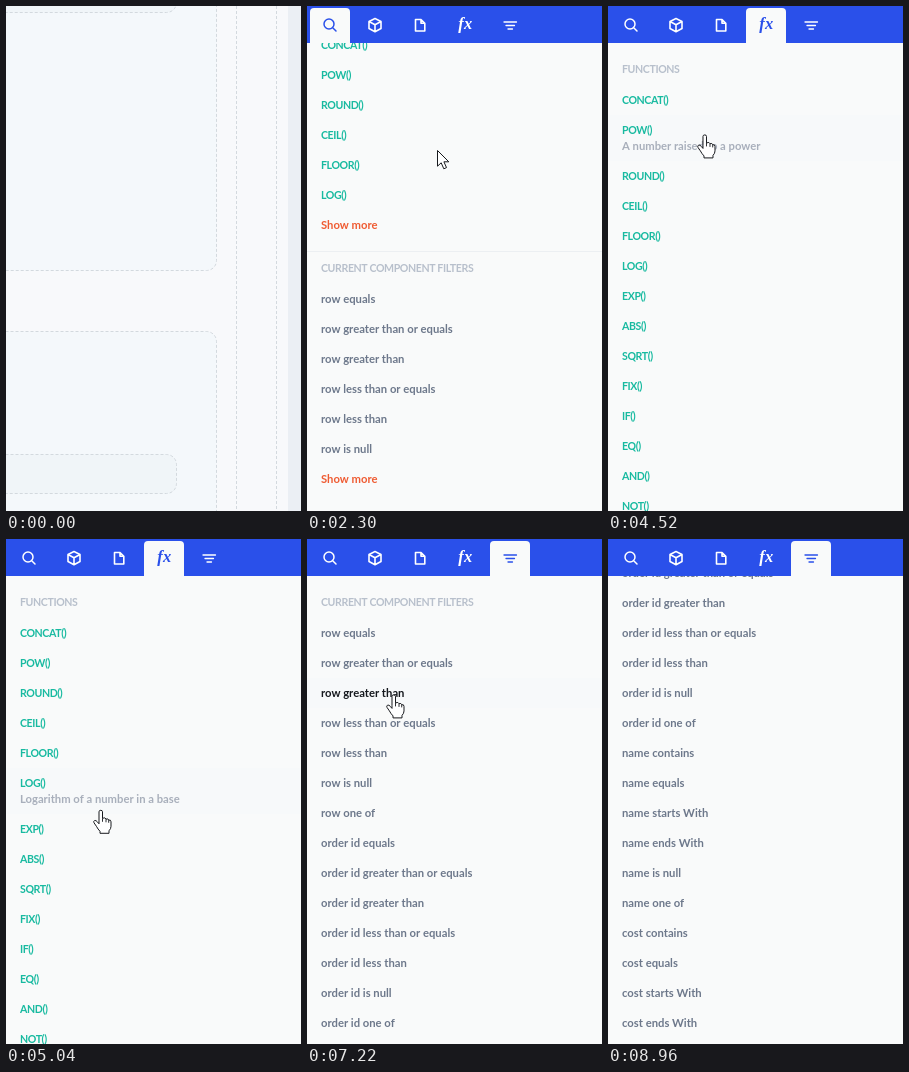
An HTML page with a canvas for the animation above (9020 ms loop, 295 by 505 pixels).

```html
<!DOCTYPE html>
<html lang="en">
<head>
<meta charset="utf-8">
<title>Data picker</title>
<style>
html, body { margin: 0; width: 295px; height: 505px; overflow: hidden; background: #f9fafa; }
canvas { display: block; }
</style>
</head>
<body>
<canvas id="stage" width="295" height="505"></canvas>
<script>
const ctx = document.getElementById('stage').getContext('2d');
const W = 295, H = 505, LOOP = 9020, HEADER = 37;
const BLUE = '#2a50ea', PANEL = '#f9fafa', TEAL = '#18baa0';
const INK = { row: '#6d788b', head: '#b8c0cc', empty: '#9aa4b4', desc: '#a8afbb', fn: TEAL, more: '#ef5b32' };
const BODY = { font: 'bold 11.25px Lato, sans-serif', spacing: '0px' };
const CAPS = { font: 'bold 10.6px Lato, sans-serif', spacing: '-0.4px' };
const SERIF = { font: "italic bold 16.5px 'Liberation Serif', serif", spacing: '0.5px' };

const ease = {
  in: p => 1 - Math.cos(p * Math.PI / 2),
  out: p => Math.sin(p * Math.PI / 2),
  both: p => (1 - Math.cos(p * Math.PI)) / 2
};

// Tracks: [time, value..., easing used to arrive there]
const cursorTrack = [
  [760, 293, 352], [1220, 132, 132, 'both'],
  [1420, 132, 132], [1590, 130, 144, 'both'],
  [2720, 130, 144], [2880, 88, 151, 'both'],
  [3110, 88, 151], [3610, 157, 28, 'both'],
  [4150, 157, 28], [4520, 97, 128, 'in'], [5060, 95, 271, 'out'],
  [5660, 95, 271], [6340, 197, 26, 'both'],
  [6870, 197, 26], [7220, 87, 155, 'in'], [7780, 87, 297, 'out'],
  [8590, 87, 297], [8960, 296, 62, 'both']
];
const scrollTracks = [
  [[1615, 0], [1740, 130, 'both'], [1910, 130], [2320, 533, 'both'], [2720, 533], [2840, 549, 'both']],
  [[5070, 0], [5500, 359, 'both']],
  [[7790, 0], [8020, 300, 'both']]
];

function sample(track, t, dims) {
  const pick = k => k.slice(1, 1 + dims);
  if (t <= track[0][0]) return pick(track[0]);
  const i = track.findIndex(k => k[0] > t);
  if (i < 0) return pick(track[track.length - 1]);
  const a = track[i - 1], b = track[i];
  const p = ease[b[dims + 1] || 'both']((t - a[0]) / (b[0] - a[0]));
  return pick(a).map((v, n) => v + (b[n + 1] - v) * p);
}

const functions = [
  ['CONCAT', 'Joins several text values together'],
  ['POW', 'A number raised to a power'],
  ['ROUND', 'Rounds number to nearest multiple of a factor'],
  ['CEIL', 'Rounds number up to nearest multiple of a factor'],
  ['FLOOR', 'Rounds number down to nearest multiple of a factor'],
  ['LOG', 'Logarithm of a number in a base'],
  ['EXP', 'Euler\u2019s number raised to a power'],
  ['ABS', 'Absolute value of a number'],
  ['SQRT', 'Square root of a number'],
  ['FIX', 'Rounds number to decimal places'],
  ['IF', 'Picks a value by a condition'],
  ['EQ', 'Whether two values are equal'],
  ['AND', 'Whether all values are true'],
  ['NOT', 'Opposite of a true or false value'],
  ['OR', 'Whether any value is true'],
  ['XOR', 'Whether exactly one value is true'],
  ['SIZE', 'Number of items in a dataset'],
  ['MIN', 'Minimum value in a numeric dataset'],
  ['MAX', 'Maximum value in a numeric dataset'],
  ['AVERAGE', 'Average of a numeric dataset'],
  ['SUM', 'Sum of a numeric dataset'],
  ['STRING', 'Converts a value to text'],
  ['NUMBER', 'Converts a value to a number'],
  ['JSON', 'Converts a value to JSON'],
  ['SLUGIFY', 'Converts text to a slug']
].map(([name, desc]) => ({ kind: 'fn', text: name + '()', desc }));

const numeric = ['equals', 'greater than or equals', 'greater than', 'less than or equals', 'less than', 'is null', 'one of'];
const textual = ['contains', 'equals', 'starts With', 'ends With', 'is null', 'one of'];
const row = (text, extra) => ({ kind: 'row', text, ...extra });
const filterRows = (field, tests) => tests.map(test => row(field + ' ' + test, { live: true }));
const filters = [
  ...filterRows('row', numeric), ...filterRows('order id', numeric),
  ...filterRows('name', textual), ...filterRows('cost', textual)
];
const more = { kind: 'more', text: 'Show more' };
const nothing = { kind: 'empty', text: 'Nothing here' };
const open = { chevron: true };

// Gives every item its resting y; sections are [heading, items].
function layout(sections) {
  const items = [];
  let y = 63;
  sections.forEach(([title, rows], n) => {
    items.push({ kind: 'head', text: title, y, ruled: n > 0 });
    y += 31;
    for (const item of rows) { items.push({ ...item, y }); y += 30; }
    y += 13;
  });
  return items;
}

const lists = [
  layout([
    ['COMPONENTS', [row('Orders', { icon: 'table', ...open }), row('User Detail', open), row('Order Details', open),
      row('Media', { icon: 'stack', ...open }), row('Transaction details', open),
      row('Amount', { icon: 'letter', value: '84900', live: true }), more]],
    ['PAGE PARAMETERS', [nothing]],
    ['USER PROPERTIES', [nothing]],
    ['TEAM PROPERTIES', [nothing]],
    ['FUNCTIONS', [...functions.slice(0, 6), more]],
    ['CURRENT COMPONENT FILTERS', [...filters.slice(0, 6), more]]
  ]),
  layout([['FUNCTIONS', functions]]),
  layout([['CURRENT COMPONENT FILTERS', filters]])
];

function text(str, x, y, color, style = BODY, align = 'left') {
  ctx.font = style.font;
  ctx.letterSpacing = style.spacing;
  ctx.fillStyle = color;
  ctx.textAlign = align;
  ctx.fillText(str, x, y + 4);
}

function stroke(d, color, width) {
  ctx.strokeStyle = color;
  ctx.lineWidth = width;
  ctx.stroke(new Path2D(d));
}

function box(x, y, w, h, r, fill) {
  ctx.beginPath();
  ctx.roundRect(x, y, w, h, r);
  ctx.fillStyle = fill;
  ctx.fill();
}

function drawCanvasPage() {
  ctx.fillStyle = '#f8f9fb';
  ctx.fillRect(0, 0, W, H);
  ctx.fillStyle = '#ebeff4';
  ctx.fillRect(282, 0, 13, H);
  ctx.lineWidth = 1;
  ctx.strokeStyle = '#d3d9de';
  ctx.setLineDash([3, 2]);
  const frame = (right, top, bottom, fill) => {
    box(-30.5, top, right + 30.5, bottom - top, 10, fill);
    ctx.stroke();
  };
  frame(210.5, -40.5, 264.5, '#f4f8fb');
  frame(210.5, 325.5, 560.5, '#f4f8fb');
  frame(170.5, -32.5, 6.5, '#f0f5f8');
  frame(170.5, 448.5, 487.5, '#f0f5f8');
  stroke('M230.5 0V505M270.5 0V505', '#d3d9de', 1);
  ctx.setLineDash([]);
}

function drawIcon(kind, y) {
  ctx.save();
  ctx.translate(14, y - 6);
  const color = '#9ba1b4';
  if (kind === 'table') stroke('M1.5 1.5H12.5V12.5H1.5ZM1.5 4.5H12.5M5 4.5V12.5M9 4.5V12.5', color, 1.2);
  if (kind === 'stack') stroke('M1.5 4.5H10V12.5H1.5ZM1.5 6H10M3.5 3V1.5H12.5V10.5H11.5', color, 1.2);
  if (kind === 'letter') stroke('M2.5 11.5L7 2L11.5 11.5M4.2 8.4H9.8', color, 1.5);
  ctx.restore();
}

function findHover(items, t, scroll, [x, y]) {
  const idle = t < 760 || (t > 1220 && t < 2720) || (t > 8000 && t < 8590) || t >= 8960;
  if (idle || y < HEADER || x > W) return null;
  // Moving down, an expanded row keeps the pointer over its description.
  const reach = t > 4150 && t < 5070 ? 31 : 15;
  return items.find(i => (i.desc || i.live) && y >= i.y - scroll - 15 && y < i.y - scroll + reach) || null;
}

function drawList(items, t, target, pointer) {
  const hover = findHover(items, t, target, pointer);
  const grow = hover && hover.desc ? 16 : 0;
  const end = items[items.length - 1].y + grow - 471;
  const scroll = Math.min(target, Math.max(0, end));
  ctx.save();
  ctx.beginPath();
  ctx.rect(0, HEADER, W, H - HEADER);
  ctx.clip();
  for (const item of items) {
    const y = Math.round(item.y - scroll + (hover && item.y > hover.y ? grow : 0));
    if (y < 0 || y > H + 30) continue;
    const active = item === hover;
    if (active) {
      ctx.fillStyle = '#f7f9fa';
      ctx.fillRect(0, y - 15, W, 30 + grow);
    }
    if (item.ruled) {
      ctx.fillStyle = '#eceff2';
      ctx.fillRect(0, y - 17, W, 1);
    }
    const caps = item.kind === 'head' || item.kind === 'fn';
    const color = active && item.live ? '#15181d' : INK[item.kind];
    text(item.text, item.icon ? 34 : 14, y, color, caps ? CAPS : BODY);
    if (item.icon) drawIcon(item.icon, y);
    if (item.value) text(item.value, 282, y, '#98a2b2', BODY, 'right');
    if (item.chevron) stroke(`M272.5 ${y - 3.5}l4.5 4.5l-4.5 4.5`, '#8d97a7', 1.3);
    if (active && item.desc) text(item.desc, 14, y + 16, INK.desc);
  }
  ctx.restore();
}

function drawHeader(active) {
  ctx.fillStyle = BLUE;
  ctx.fillRect(0, 0, W, HEADER);
  box(3 + 45 * active, 2, 40, 35, [4, 4, 0, 0], PANEL);
  const tint = n => n === active ? BLUE : '#ffffff';
  ctx.lineCap = ctx.lineJoin = 'round';
  stroke('M27 18A5 5 0 1 1 17 18A5 5 0 1 1 27 18M25.7 21.7L29 25', tint(0), 1.5);
  stroke('M68 12.5L74 15.5V22.5L68 25.7L62 22.5V15.5ZM62 15.5L68 18.7L74 15.5M68 18.7V25.7', tint(1), 1.6);
  stroke('M108.5 13.5H114L117.8 17.3V25H108.5ZM114 13.5V17.3H117.8', tint(2), 1.6);
  text('fx', 158.5, 19, tint(3), SERIF, 'center');
  stroke('M197 16H209.5M199 19.5H207.5M201 23H205.5', tint(4), 1.3);
  ctx.lineCap = 'butt';
}

const arrow = new Path2D('M.5 .5V16.2L4.2 12.8L6.8 18.8L9.5 17.6L6.9 11.8H11.8Z');
const hand = new Path2D('M-2 11V2Q-2 .5 -.2 .5Q1.5 .5 1.5 2V8.5Q4.4 7.2 5 9.3Q7.3 8.4 7.7 10.3Q10 9.8 10 12V16.5Q10 19 8 21V23.5H-1V21.5Q-3 19.5 -4.6 16.5L-7 13Q-7.8 11.5 -6.5 10.8Q-5 10.2 -3.7 12L-2 14Z');

function drawCursor(t, [x, y]) {
  if (t < 760 || t >= 8960) return;
  const isHand = t >= 2720;
  const shape = isHand ? hand : arrow;
  ctx.save();
  ctx.translate(x, y);
  ctx.lineJoin = 'round';
  ctx.fillStyle = '#ffffff';
  ctx.strokeStyle = '#17191d';
  ctx.lineWidth = 1;
  ctx.fill(shape);
  ctx.stroke(shape);
  if (isHand) stroke('M1.5 8.5V12M5 9.3V12.5M7.7 10.3V13', '#17191d', 0.9);
  ctx.restore();
}

function draw(t) {
  if (t < 100) return drawCanvasPage();
  const view = t < 3600 ? 0 : t < 6340 ? 1 : 2;
  const pointer = sample(cursorTrack, t, 2);
  const [scroll] = sample(scrollTracks[view], t, 1);
  ctx.fillStyle = PANEL;
  ctx.fillRect(0, 0, W, H);
  drawList(lists[view], t, scroll, pointer);
  drawHeader([0, 3, 4][view]);
  drawCursor(t, pointer);
}

const start = performance.now();
function tick() {
  draw((performance.now() - start) % LOOP);
  requestAnimationFrame(tick);
}
tick();
</script>
</body>
</html>
```
